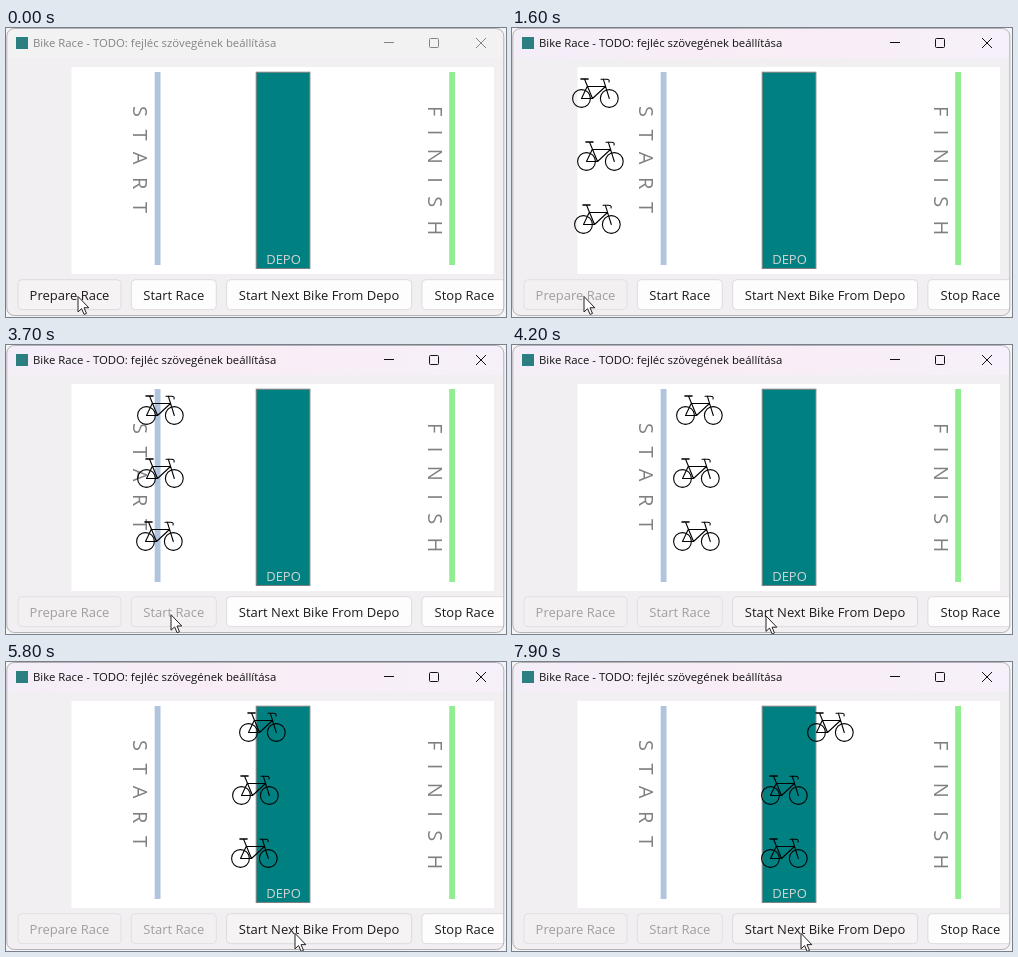
These frames come from a looping animation (500x289 px, 8 s). An HTML page:

```html
<!DOCTYPE html>
<html lang="hu">
<head>
<meta charset="utf-8">
<title>Bike Race</title>
<style>
  html, body { margin: 0; width: 100%; height: 100%; overflow: hidden; background: #f4f4f4; }
  svg { display: block; width: 100vw; height: 100vh; font-family: "Open Sans", "Noto Sans", sans-serif; }
  .caption { font-size: 11.35px; }
  .track { font-size: 20px; fill: #808080; }
  .button rect { fill: #fdfdfd; stroke: #dddadc; }
  .button text { font-size: 13px; fill: #1a1a1a; text-anchor: middle; }
  .button.hover rect { fill: #f6f3f4; }
  .button.pressed rect, .button.disabled rect { fill: #f3f0f2; stroke: #e2dfe1; }
  .button.pressed text { fill: #666; }
  .button.disabled text { fill: #a09ea0; }
</style>
</head>
<body>
<svg viewBox="0 0 500 289">
  <defs>
    <linearGradient id="activeBar">
      <stop offset="0" stop-color="#f4eef8"/>
      <stop offset="0.5" stop-color="#f9edf6"/>
      <stop offset="1" stop-color="#f6f0fa"/>
    </linearGradient>
    <clipPath id="windowClip"><rect x="1" y="0.5" width="496.5" height="287" rx="7"/></clipPath>
    <g id="bike" fill="none" stroke="#000" stroke-width="1.1" stroke-linecap="round" stroke-linejoin="round">
      <circle cx="9.5" cy="21.5" r="8.9"/>
      <circle cx="37.3" cy="21.5" r="8.9"/>
      <path d="M9.5 21.5H20.5L33.5 9.5H15.2ZM20.5 21.5L12.7 2.5M37.3 21.5L31.3 2.2"/>
      <path d="M29 2.2H34.5Q38 2.4 37 5"/>
      <path d="M9 2H16" stroke-width="1.6"/>
    </g>
  </defs>

  <g clip-path="url(#windowClip)">
    <rect width="500" height="289" fill="#f2eff2"/>
    <rect id="titleBar" width="500" height="30"/>
    <rect x="10" y="9" width="12" height="12" fill="#2b7f80"/>
    <g id="titleContent">
      <text class="caption" x="27" y="19" fill="currentColor">Bike Race - TODO: fejléc szövegének beállítása</text>
      <g fill="none" stroke="currentColor">
        <path d="M378 14.5H388M470 10L480 20M480 10L470 20"/>
        <rect x="423.5" y="10.5" width="9" height="9" rx="1"/>
      </g>
    </g>

    <rect x="65.5" y="39" width="422.5" height="207" fill="#fff"/>
    <rect x="148.7" y="44" width="5.8" height="193" fill="#b0c4de"/>
    <rect x="443.2" y="44" width="5.8" height="193" fill="#90ee90"/>
    <text class="track" transform="translate(127 78) rotate(90)" letter-spacing="12.6">START</text>
    <text class="track" transform="translate(421.5 78) rotate(90)" letter-spacing="13.4">FINISH</text>
    <rect x="250.2" y="44.2" width="53.7" height="196.3" fill="#008080" stroke="#808080"/>
    <text x="277.5" y="236" font-size="13" fill="#d3d3d3" text-anchor="middle">DEPO</text>
    <g id="bikes"></g>
    <g id="buttons"></g>
  </g>
  <rect x="0.8" y="0.5" width="497" height="287" rx="7.5" fill="none" stroke="#b5b2b5"/>
  <path id="cursor" d="M0 0V15.5L3.6 12.2L6.1 18L8.5 17L6 11.3H10.8Z" fill="#fff" stroke="#222" stroke-linejoin="round"/>
</svg>
<script>
const LOOP = 8000, TICK = 100;
const PREPARE_CLICK = 1000, START_CLICK = 3400, NEXT_CLICK = 7300;
const BIKES_APPEAR = 1200, BIKE_TOP = 49, LANE_HEIGHT = 63, ENTRY_RUN = 27;
const BUTTON_GAP = 10.3;
const byId = id => document.getElementById(id);
const clamp01 = value => Math.min(1, Math.max(0, value));

function add(parent, tag, attributes, text = '') {
  const node = document.createElementNS('http://www.w3.org/2000/svg', tag);
  for (const [name, value] of Object.entries(attributes)) node.setAttribute(name, value);
  node.textContent = text;
  return parent.appendChild(node);
}

// Leg i leads steadily from stop i to stop i + 1.
function travel(stops, legs, time, clock = t => t) {
  return stops.slice(1).reduce((x, stop, i) => {
    const [from, to] = legs[i].map(clock);
    return x + (stop - stops[i]) * clamp01((clock(time) - from) / (to - from));
  }, stops[0]);
}

// The riders' clock stands still for one tick at each pause.
const pauses = [1700, 2100, 4900, 5200, 7800];
const rideClock = time => time - TICK * pauses.filter(pause => pause <= time).length;

const rideLegs = [[1100, 1600], [1600, 2600], [3300, 4200], [4200, 5300], [5300, 6300], [7200, 7900]];
const bikes = [
  [60, 104, 164, 213, 252, 295],
  [65, 107, 161, 203, 249],
  [62, 105, 161, 201, 249]
].map(stops => ({
  stops: [stops[0] - ENTRY_RUN, ...stops],
  node: add(byId('bikes'), 'use', { href: '#bike' })
}));

const cursorStops = [72, 165, 254, 289];
const cursorLegs = [[2100, 2600], [3700, 4200], [4200, 4800]];

let buttonX = 12;
const buttons = [
  { label: 'Prepare Race', width: 103, click: PREPARE_CLICK, clickOnce: true },
  { label: 'Start Race', width: 85, click: START_CLICK, clickOnce: true },
  { label: 'Start Next Bike From Depo', width: 185, click: NEXT_CLICK },
  { label: 'Stop Race', width: 85 }
].map(button => {
  const { label, width } = button, x = buttonX;
  const node = add(byId('buttons'), 'g', {});
  add(node, 'rect', { x, y: 251.7, width, height: 30, rx: 4 });
  add(node, 'text', { x: x + width / 2, y: 272 }, label);
  buttonX += width + BUTTON_GAP;
  return { ...button, x, node };
});

function buttonState({ x, width, click, clickOnce }, time, pointer) {
  if (clickOnce && time >= click + TICK) return 'disabled';
  if (time >= click && time < click + TICK) return 'pressed';
  return pointer >= x && pointer <= x + width ? 'hover' : '';
}

function draw(time) {
  const active = time >= PREPARE_CLICK;
  byId('titleBar').setAttribute('fill', active ? 'url(#activeBar)' : '#f3f2f3');
  byId('titleContent').setAttribute('color', active ? '#111' : '#858385');

  byId('bikes').setAttribute('visibility', time >= BIKES_APPEAR ? 'visible' : 'hidden');
  bikes.forEach(({ stops, node }, lane) => {
    const x = Math.round(travel(stops, rideLegs, time, rideClock));
    node.setAttribute('transform', `translate(${x} ${BIKE_TOP + lane * LANE_HEIGHT})`);
  });

  const pointer = travel(cursorStops, cursorLegs, time);
  byId('cursor').setAttribute('transform', `translate(${pointer} ${267.5 + pointer / 75})`);
  for (const button of buttons) {
    button.node.setAttribute('class', 'button ' + buttonState(button, time, pointer));
  }
}

const startTime = performance.now();
function animate() {
  const time = (performance.now() - startTime) % LOOP;
  draw(Math.floor(time / TICK) * TICK);
  requestAnimationFrame(animate);
}
animate();
</script>
</body>
</html>
```
